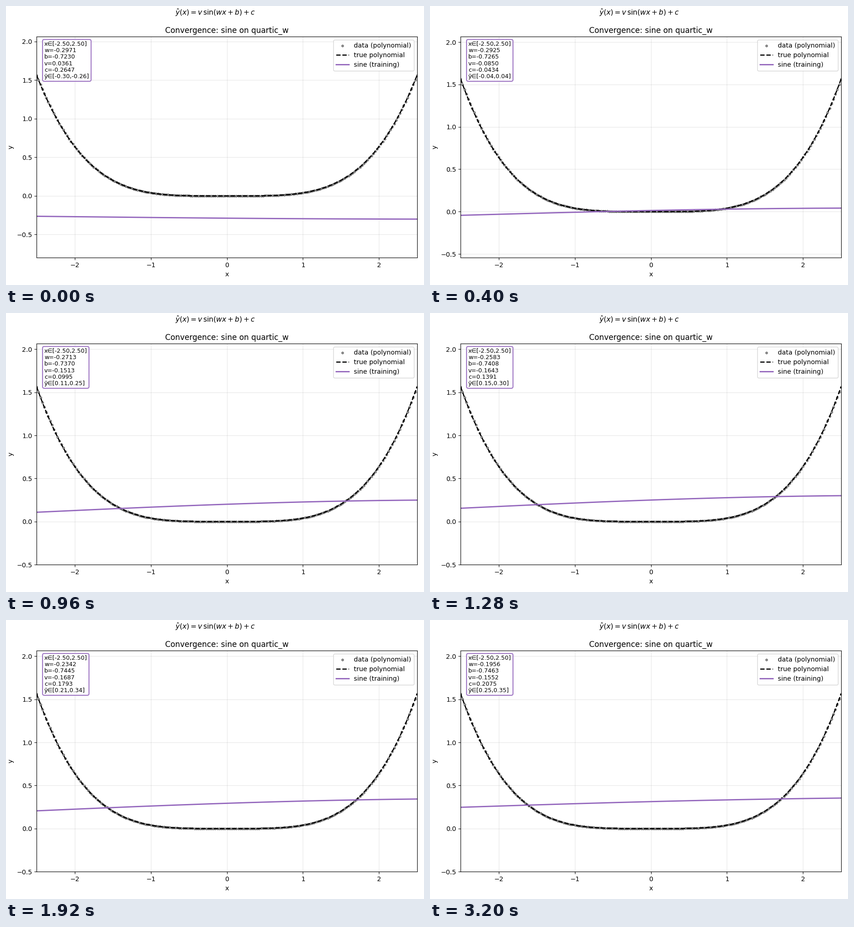
Write a matplotlib script that moves like this. It is 917 px wide and 611 px high and loops after 3.28 s.

```python
import numpy as np
import matplotlib.pyplot as plt
from matplotlib.animation import FuncAnimation

W, H, DPI = 917, 611, 101.87
FRAMES, INTERVAL = 41, 80
PURPLE = "#9467bd"
STEPS, RATE = 20, 0.005  # descent steps per frame and their size

x = np.linspace(-2.5, 2.5, 201)
y = 0.04 * x**4


def model(p):
    w, b, v, c = p
    return v * np.sin(w * x + b) + c


def descend(p):
    """Run one frame's worth of gradient descent on the squared error."""
    for _ in range(STEPS):
        w, b, v, c = p
        err = model(p) - y
        slope = err * v * np.cos(w * x + b)
        grad = (slope * x, slope, err * np.sin(w * x + b), err)
        p = p - RATE * np.array([g.mean() for g in grad])
    return p


history = [np.array([-0.2971, -0.7230, 0.0361, -0.2647])]
while len(history) < FRAMES:
    history.append(descend(history[-1]))

plt.rcParams["font.family"] = "DejaVu Sans"
eps = 1e-6  # keeps the pixel size from rounding down
fig = plt.figure(figsize=((W + eps) / DPI, (H + eps) / DPI), dpi=DPI)
left, right, bottom, top = 67.3, 901.7, 59.8, 543.6
ax = fig.add_axes([left / W, bottom / H, (right - left) / W, (top - bottom) / H])

fig.suptitle(r"$\hat{y}(x)=v\,\sin(wx+b)+c$", fontsize=11, y=0.995)
ax.set_title("Convergence: sine on quartic_w")
ax.set_xlabel("x")
ax.set_ylabel("y")
ax.set_xlim(-2.5, 2.5)
ax.grid(True, alpha=0.3)

ax.scatter(x, y, s=10, color="black", alpha=0.4, label="data (polynomial)")
ax.plot(x, y, "k--", lw=1.8, label="true polynomial")
curve, = ax.plot(x, model(history[0]), color=PURPLE, lw=2, label="sine (training)")
ax.legend(loc="upper right")
info = ax.text(
    0.02, 0.98, "", transform=ax.transAxes, fontsize=9, linespacing=1.12,
    va="top", ha="left",
    bbox=dict(boxstyle="round,pad=0.3", fc="white", ec=PURPLE, lw=1.5, alpha=0.9),
)


def update(i):
    p = history[i]
    fit = model(p)
    curve.set_ydata(fit)
    ax.set_ylim(min(y.min(), fit.min()) - 0.5, max(y.max(), fit.max()) + 0.5)
    lines = [f"x∈[{x[0]:.2f},{x[-1]:.2f}]"]
    lines += [f"{name}={value:.4f}" for name, value in zip("wbvc", p)]
    lines.append(f"ŷ∈[{fit.min():.2f},{fit.max():.2f}]")
    info.set_text("\n".join(lines))
    return curve, info


anim = FuncAnimation(fig, update, frames=FRAMES, interval=INTERVAL,
                     repeat=True, repeat_delay=0, blit=False)
plt.show()
```
